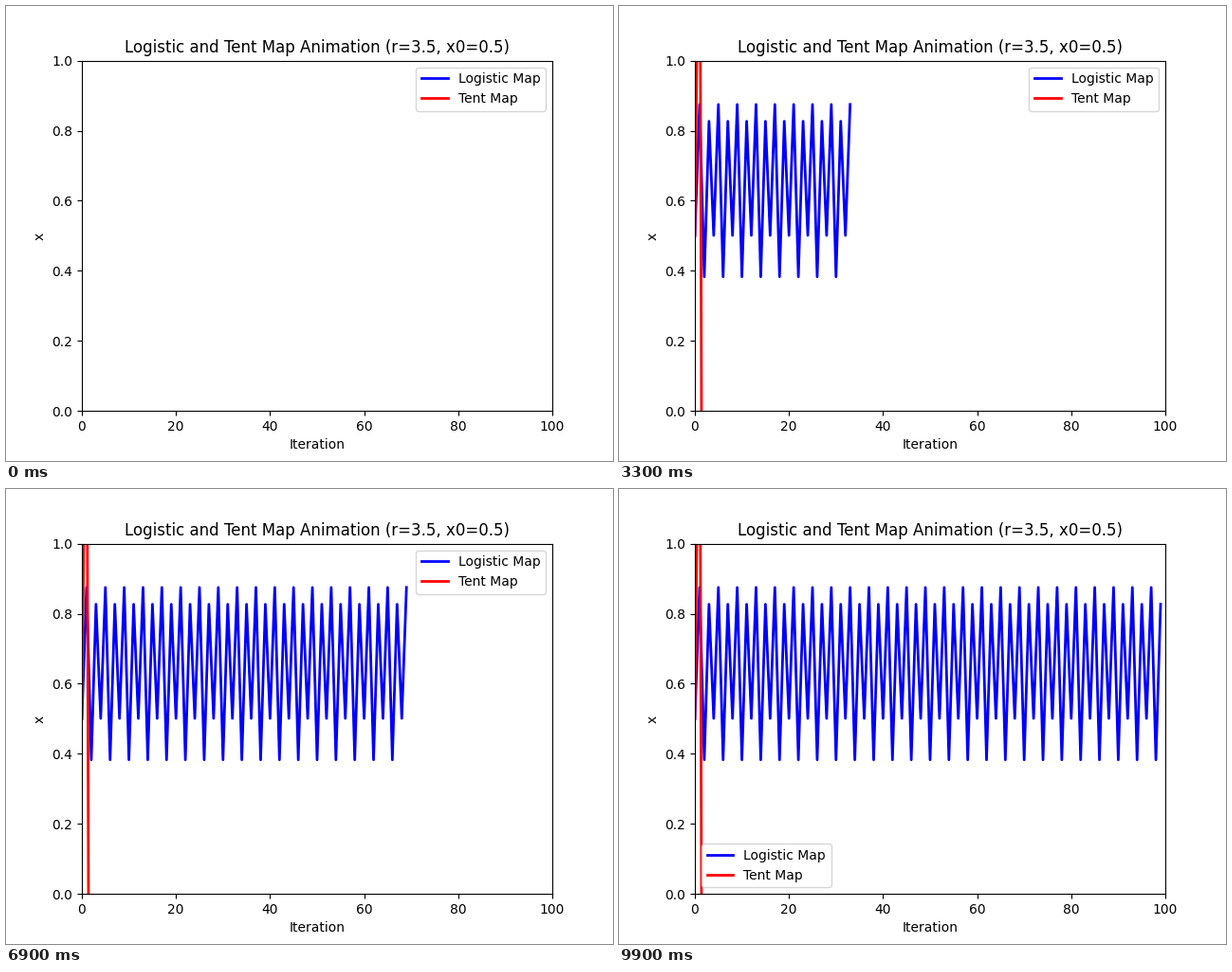
A matplotlib script that plays this animation: 640x480 px, repeating every 10000 ms.

```python
import numpy as np
import matplotlib.pyplot as plt
from matplotlib.animation import FuncAnimation

R, X0, STEPS = 3.5, 0.5, 100


def logistic(x):
    return R * x * (1 - x)


def tent(x):
    return R * min(x, 1 - x)


def orbit(step):
    xs = [X0]
    while len(xs) < STEPS:
        xs.append(step(xs[-1]))
    return np.array(xs)


fig, ax = plt.subplots(figsize=(6.4, 4.8), dpi=100)
ax.set(xlim=(0, STEPS), ylim=(0, 1), xlabel="Iteration", ylabel="x",
       title=f"Logistic and Tent Map Animation (r={R}, x0={X0})")

curves = []
for step, color, label in ((logistic, "blue", "Logistic Map"),
                           (tent, "red", "Tent Map")):
    line, = ax.plot([], [], color=color, lw=2, label=label)
    curves.append((line, orbit(step)))

# "best" moves the legend once the blue curve reaches it
ax.legend(loc="best")


def update(i):
    n = np.arange(i + 1)
    for line, xs in curves:
        line.set_data(n, xs[:i + 1])
    return [line for line, _ in curves]


anim = FuncAnimation(fig, update, frames=STEPS, interval=100,
                     repeat=True, repeat_delay=0, blit=False)
plt.show()
```
